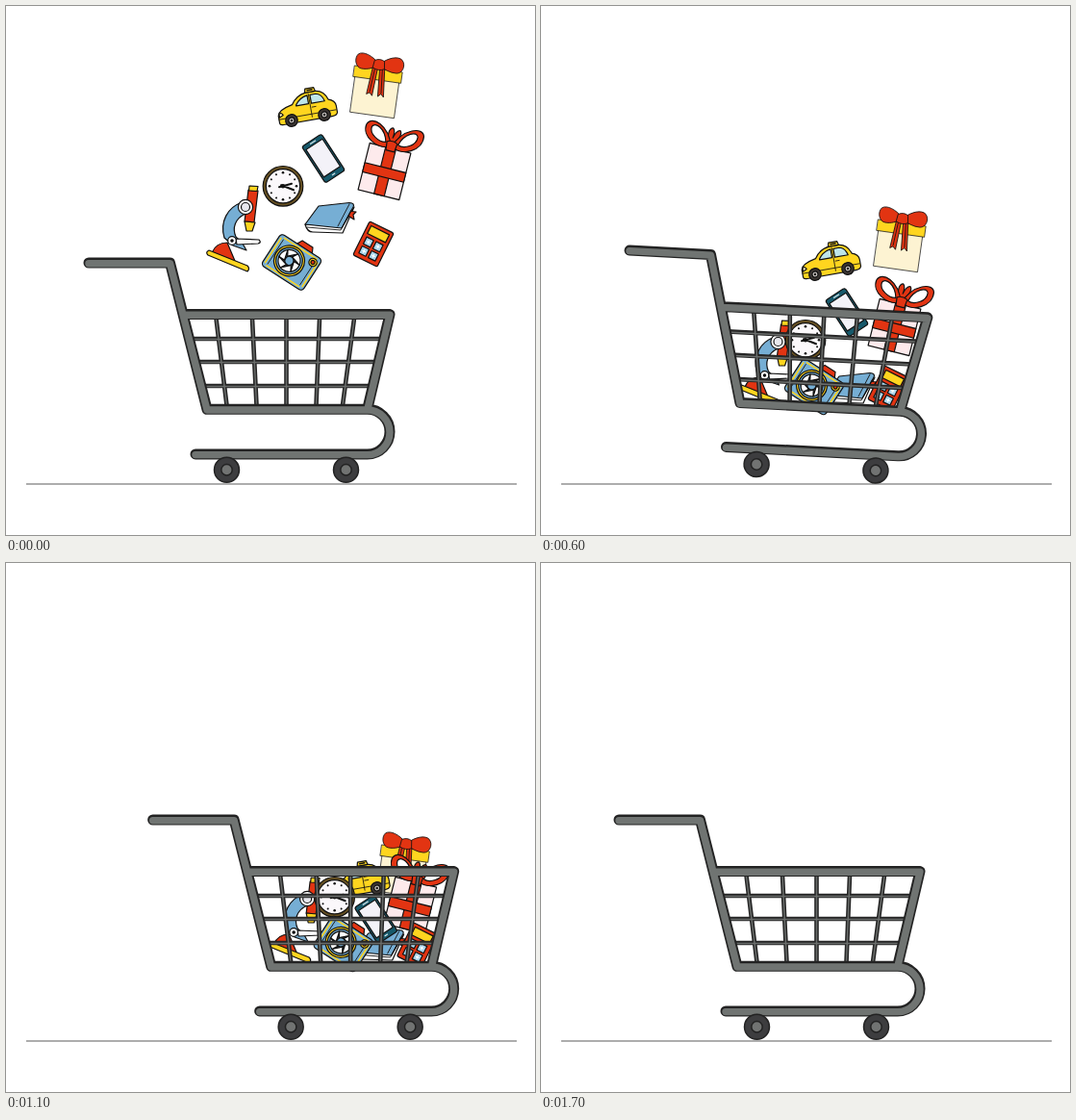
An HTML page for the animation above (1800 ms loop, 550 by 550 pixels).

```html
<!DOCTYPE html>
<html lang="en">
<head>
<meta charset="utf-8">
<title>Shopping cart</title>
<style>
html, body { margin: 0; width: 100%; height: 100%; overflow: hidden; background: #fff; }
svg { display: block; width: 100vw; height: 100vh; }
.item { stroke: #111; stroke-width: 1.2; stroke-linejoin: round; stroke-linecap: round; }
.red { fill: #e23412; } .yellow { fill: #ffd51f; } .blue { fill: #76aed4; }
.white { fill: #fff; } .black { fill: #111; } .none { fill: none; }
.cart { fill: none; stroke-linecap: round; stroke-linejoin: round; }
.edge { stroke: #232323; stroke-width: 11; }
.face { stroke: #707472; stroke-width: 7.4; }
.wireEdge { stroke: #262626; stroke-width: 4.6; stroke-linecap: butt; }
.wireFace { stroke: #6a6d6b; stroke-width: 1.5; stroke-linecap: butt; }
.wheel { stroke: #222; stroke-width: 1.5; }
</style>
</head>
<body>
<svg viewBox="0 0 550 550">
  <defs>
    <path id="frame" d="M86 267H170.500L209 419.300H375.700L399 320.500H186M375.700 419.300A23.300 23.300 0 0 1 375.700 465.900H197"/>
    <path id="wires" d="M218.500 325L229.500 415M256 325L260.500 415M291.500 325V415M326 325L322.500 415M362 325L350 415M192 346H391M197 370H385M203 395H379"/>
    <g id="wheel" class="wheel">
      <circle r="13" fill="#3d3d3f"/>
      <circle r="5.700" fill="#717372"/>
    </g>
    <g id="cart" class="cart">
      <use href="#wires" class="wireEdge"/>
      <use href="#wires" class="wireFace" y=".5"/>
      <use href="#frame" class="edge"/>
      <use href="#frame" class="face" y=".7"/>
      <use href="#wheel" x="229.500" y="482.300"/>
      <use href="#wheel" x="353.500" y="482.300"/>
    </g>
  </defs>
  <path d="M21 497H531" stroke="#929292" stroke-width="1.700"/>

  <g id="load">
    <g id="goldGift" class="item"><g transform="translate(386 90) rotate(8)" stroke-width=".8">
      <path fill="#fdf3d2" stroke-width=".7" d="M-25-14H21V24H-25Z"/>
      <path class="yellow" stroke-width=".7" d="M-27-24.500H23V-13H-27Z"/>
      <path class="red" d="M-8-28L-11 3L-8 1L-5 4L-3-26ZM-1-26L1 4L4 1L7 4L4-28Z"/>
      <path class="none" d="M-6-24L-8 0M2-24L4 0"/>
      <path class="red" d="M-4-31C-10-37-20-41-25-37C-29-32-26-23-20-22.500C-13-22-8-25-4-27ZM0-31C6-37 16-41 21-37C26-32 23-23 17-22.500C10-22 4-25 0-27Z"/>
      <path class="red" d="M-7-33Q-2-36 3-33L4-25Q-2-22-8-25Z"/>
    </g></g>

    <g id="taxi" class="item"><g transform="translate(314 116) rotate(-10)">
      <path class="yellow" d="M-30 1V-7Q-29-13-14-16Q-8-25 2-26H12Q21-25 24-15Q31-13 31-7V0Q30 3 25 3H-26Q-30 3-30 1Z"/>
      <path fill="#bfe6ea" d="M-10-15Q-5-22 3-23V-14H-10ZM6-23H12Q18-22 20-14H6Z"/>
      <path class="none" d="M4.500-24V0M-30-3H30M6-10H10" stroke-width=".8"/>
      <path class="yellow" d="M1-26L2-30H11L12-26Z"/>
      <path class="none" d="M4-28H9" stroke-width="1.500"/>
      <path fill="#fff3bf" d="M-29-9Q-26-10-25-7L-29-5Z"/>
      <g fill="#3a3431"><circle cx="-17.300" r="6.300"/><circle cx="17.300" r="6.300"/></g>
      <g fill="#c9c4c0"><circle cx="-17.300" r="3"/><circle cx="17.300" r="3"/></g>
      <g class="black"><circle cx="-17.300" r=".6"/><circle cx="17.300" r=".6"/></g>
    </g></g>

    <g id="pinkGift" class="item"><g transform="translate(393.500 172) rotate(14)">
      <path fill="#fdeaec" d="M-22-25H22V25H-22Z"/>
      <path class="red" d="M-5-25H6V25H-5Z"/>
      <path class="red" d="M-22-4H22V6H-22Z"/>
      <path class="red" d="M0-27C-8-36-6-45-2-46Q1-44 0-36Q2-45 6-45C9-42 6-34 0-27Z"/>
      <path class="red" d="M0-27C-13-20-32-30-30-43C-27-54-7-48 0-27ZM1-27C14-19 33-30 31-45C28-55 8-48 1-27Z"/>
      <path class="white" d="M-6-30C-13-28-25-34-24-42C-22-48-10-44-6-30ZM7-30C14-27 26-34 25-43C23-49 11-44 7-30Z"/>
      <path class="red" d="M-5-31Q0-34 6-31L5-22H-4Z"/>
    </g></g>

    <g id="book" class="item">
      <path class="white" d="M311 227Q313 235 319 235L350 236L362 209L350 229Z"/>
      <path class="red" d="M354 213L364 214L361 217L362 222L357 219Z"/>
      <path class="blue" d="M325 208L357 204.500Q363 205 361 209L349 231L311 227Z"/>
      <path class="none" d="M313 230L348 233L359 212M357 206L345 229" stroke-width=".9"/>
    </g>

    <g id="phone" class="item"><g transform="translate(330 158.500) rotate(-33)">
      <rect x="-12.200" y="-22.500" width="24.400" height="45" rx="2.500" fill="#17596b"/>
      <rect x="-10.200" y="-17.500" width="20.400" height="34" fill="#f3f2f8"/>
      <path stroke="#d9e8ec" d="M-3-20H3M-1.500 19.500H1.500"/>
    </g></g>

    <g id="calculator" class="item"><g transform="translate(382 247.500) rotate(26.500)">
      <rect class="red" x="-14" y="-19.500" width="28" height="39" rx="2"/>
      <rect class="yellow" x="-10.500" y="-16" width="21" height="9"/>
      <g id="keys" fill="#a8d5ec"></g>
    </g></g>

    <g id="microscope" class="item">
      <path class="red" d="M214 257Q218 246 230 246L238 265L236 268Z"/>
      <path class="yellow" d="M211 254L251 270Q254 273 251 276L210 259Q207 256 211 254Z"/>
      <path class="blue" d="M246 204C230 209 222 225 227 241L236 249L250 254L246 247L239 240C235 231 238 221 249 216Z"/>
      <path class="red" d="M252 191L262 192L258 225L248 224Z"/>
      <path class="yellow" d="M253 187L262 187.500L261 192.500L252.500 192ZM248 224L259 225L256 234H250Z"/>
      <circle class="white" cx="249" cy="209" r="7.600"/>
      <circle fill="#e8e8ee" cx="249" cy="209" r="4.500"/>
      <path class="white" d="M239 242L263 243Q266 246 262 247L240 248Z"/>
      <circle class="white" cx="235" cy="244" r="4.300"/>
      <circle class="black" cx="235" cy="244" r="1.200"/>
    </g>

    <g id="clock" class="item"><g transform="translate(288 187.300)">
      <circle r="20.800" fill="#665022"/>
      <circle r="17.600" fill="#fbf8fb"/>
      <g id="hours" class="black" stroke="none"></g>
      <path class="none" d="M-4 1L9-2.500M-2-1L11 4" stroke-width="2"/>
      <circle class="black" r="1.600"/>
    </g></g>

    <g id="camera" class="item"><g transform="translate(297 266.500) rotate(33)">
      <path class="red" d="M-6-19L-3-25H10L13-19Z"/>
      <rect class="blue" x="-25.500" y="-19.500" width="51" height="39" rx="4"/>
      <path fill="none" stroke="#ffd51f" stroke-width="1.600" d="M-23-15V15M23-14V15M-20-17H20M-20 17H20"/>
      <path class="none" d="M-20-15V15M20-10V15" stroke-width=".8"/>
      <circle class="yellow" cx="-3" r="16"/>
      <circle class="blue" cx="-3" r="13.800"/>
      <circle class="white" cx="-3" r="11.500"/>
      <g id="blades" transform="translate(-3 0)" class="none"></g>
      <circle class="blue" cx="-3" r="4.500"/>
      <circle class="yellow" cx="18.500" cy="-12" r="4.200"/>
      <circle class="red" cx="18.500" cy="-12" r="2"/>
    </g></g>
  </g>

  <use id="leaving" href="#cart"/>
  <use id="arriving" href="#cart"/>
</svg>
<script>
const $ = id => document.getElementById(id);
const LOOP = 1800, STEP = 100;

// Repeated small parts
$("keys").innerHTML = [-9.5, 1.5].flatMap(x => [-3.5, 7].map(y =>
  `<rect x="${x}" y="${y}" width="8" height="8"/>` +
  `<path d="M${x + 2.5} ${y + 4}h3m-1.500-1.500v3" stroke="#fff"/>`)).join("");
$("hours").innerHTML = Array.from({ length: 12 }, (_, i) =>
  `<circle cy="-14" r="${i % 3 ? 1 : 1.3}" transform="rotate(${i * 30})"/>`).join("");
$("blades").innerHTML = Array.from({ length: 6 }, (_, i) =>
  `<path d="M-4-3L4-11L0-4Z" fill="#35393f" transform="rotate(${i * 60})"/>`).join("");

// Offsets [x, y] of each article at the moments in dropTimes
const dropTimes = [0, 400, 600, 900];
const drops = {
  goldGift: [[-12, 130], [-12, 160], [-38.5, 231]],
  taxi: [[-12, 130], [-12, 160], [-12, 225]],
  pinkGift: [[-23.5, 130], [-26, 162], [-40, 184]],
  phone: [[-12, 130], [-12, 160], [-12, 212]],
  book: [[-12, 130], [-15, 177], [-15, 177]],
  calculator: [[-23.5, 131], [-21, 150], [-21, 150]],
  microscope: [[-12, 130], [-2.5, 140], [-2.5, 140]],
  clock: [[-13, 130], [-13, 160], [-13, 160]],
  camera: [[-12, 130], [-13, 129.5], [-13, 129.5]]
};
const tilt = [[0, 200, 300, 400, 500, 600, 700, 800, 900], [0, 0, 1, -2, 0.5, 3, -3, 1, 0]];
const hop = [[500, 600, 700], [0, -5, 0]];
const leave = [[1000, 1300, 1500, 1600, 1700], [0, 200, 300, 400, 500]];
const arrive = [[1000, 1300, 1500, 1600, 1700, 1800], [-500, -320, -200, -100, -5, 0]];

function track(t, times, values) {
  if (t <= times[0]) return values[0];
  const i = times.findIndex(time => t <= time);
  if (i < 0) return values[values.length - 1];
  const k = (t - times[i - 1]) / (times[i] - times[i - 1]);
  return values[i - 1] + (values[i] - values[i - 1]) * k;
}

const move = (id, x, y = 0, extra = "") =>
  $(id).setAttribute("transform", `translate(${x} ${y}) ${extra}`);

function draw(now) {
  const t = Math.floor((now % LOOP) / STEP) * STEP;
  const out = track(t, ...leave);
  for (const [id, stops] of Object.entries(drops)) {
    const along = axis => track(t, dropTimes, [0, ...stops.map(p => p[axis])]);
    move(id, along(0), along(1));
  }
  move("load", out);
  move("leaving", out, track(t, ...hop), `rotate(${track(t, ...tilt)} 242.500 379)`);
  move("arriving", track(t, ...arrive));
}

const start = performance.now();
function tick() {
  draw(performance.now() - start);
  requestAnimationFrame(tick);
}
tick();
</script>
</body>
</html>
```
